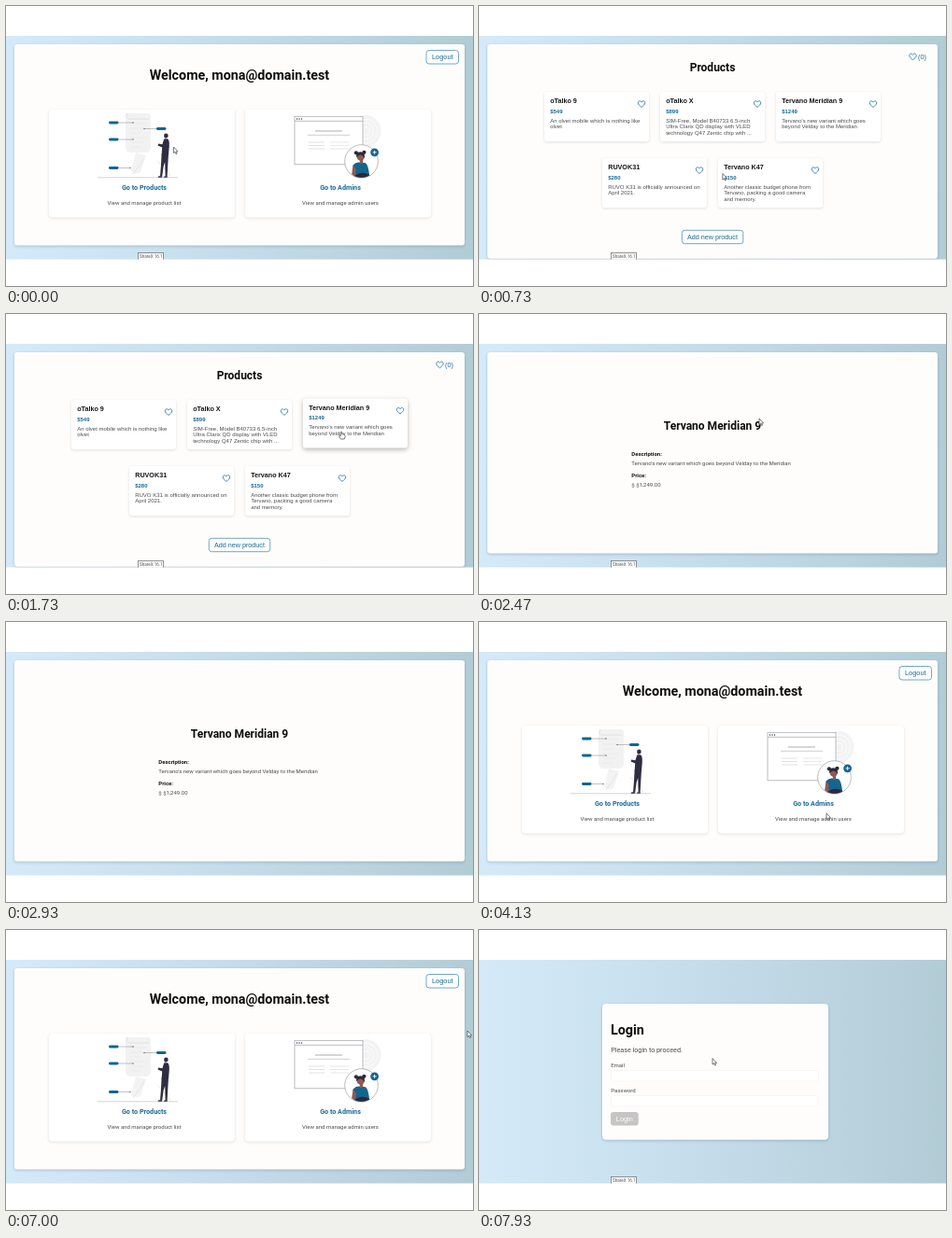
Write an HTML page that moves like this. It is 500x300 px and loops after 8 s.

```html
<!DOCTYPE html>
<html lang="en">
<head>
<meta charset="utf-8">
<title>Product admin demo</title>
<style>
html, body { margin: 0; width: 100%; height: 100%; overflow: hidden; background: #fff; }
svg { display: block; width: 500px; height: 300px; }
text { font-family: Roboto, sans-serif; font-size: 6px; fill: #4c4c4c; }
.ui { font-family: "Liberation Sans", Arial, sans-serif; }
.h { font-weight: 700; fill: #0c0c0c; }
.b { font-weight: 700; fill: #161616; }
.blue { fill: #1a6a96; }
.mid { text-anchor: middle; }
.panel { fill: #fefdfc; filter: drop-shadow(0 1px 1.5px rgba(40, 80, 110, .28)); }
.card { fill: #fff; filter: drop-shadow(0 1.4px 1.4px rgba(60, 60, 60, .15)); }
.lift .card { filter: drop-shadow(0 2px 2.5px rgba(50, 50, 50, .34)); }
.btn { fill: #fefefe; stroke: #6fa8c7; stroke-width: 1; }
.btn.over { fill: #e6f1f7; }
.heart { fill: none; stroke: #3985ab; stroke-width: .95; stroke-linejoin: round; }
</style>
</head>
<body>
<svg viewBox="0 0 500 300">
  <defs>
    <linearGradient id="sky">
      <stop offset="0" stop-color="#d5eaf9"/>
      <stop offset=".5" stop-color="#c4dce9"/>
      <stop offset="1" stop-color="#b2ccd6"/>
    </linearGradient>
    <clipPath id="view"><rect y="32" width="500" height="239.5"/></clipPath>
    <clipPath id="face"><circle cx="380.5" cy="166.5" r="17.3"/></clipPath>
  </defs>
  <g clip-path="url(#view)">
    <rect y="32" width="500" height="240" fill="url(#sky)"/>
    <g id="pages"></g>
    <g id="tip">
      <rect x="141.5" y="264.5" width="27" height="9" fill="#fff" stroke="#777" stroke-width=".8"/>
      <text x="143" y="270" style="font-size:4.6px;fill:#555">ShareX 16.1</text>
    </g>
    <g id="pointer" stroke="#4c4c4c" stroke-width=".75" stroke-linejoin="round" fill="#fff">
      <path id="arrow" d="M0 0V6.6L1.5 5.3L2.6 7.6L3.6 7.1L2.6 4.9H4.6Z"/>
      <path id="hand" d="M-.8 4V.5Q0-.5.8.5V2.8Q3.8 2.6 4 4.2V6L3.2 8H-.6L-2.6 5.2Q-2.4 4-.8 5Z"/>
    </g>
  </g>
</svg>
<script>
const LOOP = 8000, STEP = 1000 / 15;
const $ = id => document.getElementById(id);

const text = (x, y, s, cls = '', size = 6) =>
  `<text x="${x}" y="${y}" class="${cls}" style="font-size:${size}px">${s}</text>`;
const rect = (x, y, w, h, r, cls, more = '') =>
  `<rect x="${x}" y="${y}" width="${w}" height="${h}" rx="${r}" class="${cls}" ${more}/>`;
const panel = bottom => rect(9, 41, 482, bottom - 41, 3, 'panel');
const heart = (x, y) =>
  `<path class="heart" transform="translate(${x} ${y})" d="M0 3.4C-2.2 1.7-3.7.4-3.7-1.2C-3.7-3.6-.9-3.9 0-1.9C.9-3.9 3.7-3.6 3.7-1.2C3.7.4 2.2 1.7 0 3.4Z"/>`;
const line = (x1, x2, y, color, w = 1) =>
  `<path d="M${x1} ${y}H${x2}" stroke="${color}" stroke-width="${w}" fill="none"/>`;

// [pill x, line start, line end, y]
const labels = [[110, 120, 136, 125], [161, 148, 161, 131.5], [110, 120, 136, 143], [110, 120, 133, 173.5]];

function workerArt() {
  const rows = [0, 1, 2, 3, 4, 5].map(i => line(133, 150 - i % 3 * 3, 126 + i * 5, '#e6e6e6', .7)).join('');
  return `<path d="M130 115H151Q155 115 155 119V151Q155 157 149 157H134Q128 157 128 151V120Q128 115 130 115Z" fill="#f2f2f2"/>
    <path d="M130 115Q127 121 133 121H153" fill="none" stroke="#e0e0e0"/>${rows}
    <path d="M139 157L134 176Q137 182 144 178L150 160" fill="#f3f3f3"/>
    <path d="M136 180Q144 170 148 162M162 166L176 182" fill="none" stroke="#e4e4e4" stroke-width=".8"/>
    ${line(98, 184, 183.8, '#b4b4ba', .6)}` +
    labels.map(([x, a, b, y]) => line(a, b, y, '#999', .6) +
      `<circle cx="${x < a ? b : a}" cy="${y}" r=".8" fill="#777"/>` +
      rect(x, y - 1.4, 10.5, 2.8, 1.4, '', 'fill="#13658f"')).join('') +
    `<path d="M169.4 138.4Q169.4 141 170.4 142.6L172.2 142.2" fill="#a87070"/>
      <g fill="#2f2e41"><circle cx="171.4" cy="138.9" r="2.3"/>
      <path d="M169.2 142.6L173 142.3Q175.2 144 174.8 150L174 159.5H166.6L167.2 151.6L162.6 149.4L163 147.6L167.4 148.2Z"/>
      <path d="M166.6 158.5H174L173.4 168L172.6 182.5H170.6L170.2 167L168.6 172L167.2 182.5H165L166 170Z"/>
      <path d="M163.4 182.3H167.2V183.8H162.6ZM169.8 182.3H172.8V183.8H168.6Z"/></g>`;
}

function adminArt() {
  const arcs = [4, 8, 12].map(r =>
    `<ellipse cx="385.5" cy="134" rx="${r}" ry="${r * 1.08}"/>`).join('');
  const cols = [0, 1, 2].map(i => line(324, 341, 146 + i * 3.5, '#e2e2e2', 1.1) +
    line(347, 367, 146 + i * 3.5, '#e8e8e8', 1.1)).join('');
  return `<ellipse cx="385.5" cy="134" rx="16" ry="17" fill="#f3f3f3"/>
    <g fill="none" stroke="#fafafa" stroke-width="1.2">${arcs}</g>
    <rect x="309" y="118.3" width="73" height="51.5" fill="#fff" stroke="#a2a2a8" stroke-width=".7"/>
    ${line(309, 382, 123.3, '#a2a2a8', .7)}
    ${[311.5, 314, 316.5].map(x => `<circle cx="${x}" cy="120.9" r=".75" fill="#3f3d56"/>`).join('')}
    ${line(331, 360, 134, '#c8c8c8', 1.4)}${line(323, 368, 138.3, '#d8d8d8', 1.3)}${cols}
    <circle cx="380.5" cy="166.5" r="17.8" fill="#fff" stroke="#a0a0a6" stroke-width=".7"/>
    <g clip-path="url(#face)"><g transform="translate(57 25.5) scale(.85)">
      <path d="M371 188L370 171Q373 166.5 379 167L386 168Q390 171 391 188Z" fill="#14658e"/>
      <path d="M370 171L368 185H373L374 176ZM378 162H382.6V168L379 169Z" fill="#8e5a55"/>
      <circle cx="379.6" cy="160" r="4.7" fill="#8e5a55"/>
      <g fill="#2b2939"><circle cx="374" cy="155" r="2.5"/><circle cx="384" cy="154.5" r="2.5"/>
        <path d="M374.2 161Q373.5 154 379.3 153.8Q385.4 154 384.7 162Q382.6 157.8 379 157.5Q376 158 374.2 161Z"/>
        <path d="M372 184Q381 177 391 183V190H371Z"/></g>
    </g></g>
    <circle cx="394.6" cy="156.8" r="4.4" fill="#14658e"/>
    <path d="M392.6 156.8H396.6M394.6 154.8V158.8" stroke="#fff" stroke-width=".9"/>`;
}

const home = panel(256.5) +
  rect(450, 47.5, 34.5, 14.5, 3, 'btn', 'id="logout"') + text(467.3, 57.2, 'Logout', 'ui blue mid', 7.4) +
  text(250, 78.7, 'Welcome, mona@domain.test', 'h mid', 14.3) +
  rect(46, 111, 199, 115.6, 4, 'card') + rect(256, 111, 199, 115.6, 4, 'card') +
  workerArt() + adminArt() +
  text(148, 196.6, 'Go to Products', 'b blue mid', 7.2) +
  text(358, 196.6, 'Go to Admins', 'b blue mid', 7.2) +
  text(148, 213.2, 'View and manage product list', 'mid') +
  text(358, 213.2, 'View and manage admin users', 'mid');

const items = [
  [70, 92, 'oTalko 9', 549, 'An olvet mobile which is nothing like|olvet'],
  [194, 92, 'oTalko X', 899, 'SIM-Free, Model B40733 6.5-inch|Ultra Clarix QD display with VLED|technology Q47 Zentic chip with ...'],
  [318, 92, 'Tervano Meridian 9', 1249, "Tervano's new variant which goes|beyond Velday to the Meridian"],
  [132, 163, 'RUVOK31', 280, 'RUVO K31 is officially announced on|April 2021.'],
  [256, 163, 'Tervano K47', 150, 'Another classic budget phone from|Tervano, packing a good camera|and memory.']
];
const item = ([x, y, name, price, about], i) => `<g id="item${i}">` +
  rect(x, y, 112, 53, 3, 'card') +
  text(x + 6.2, y + 12.4, name, 'ui b', 7.2) +
  text(x + 6.2, y + 22.6, '$' + price, 'ui b blue', 6) +
  about.split('|').map((s, k) => text(x + 6.2, y + 32.6 + k * 6.6, s, 'ui')).join('') +
  heart(x + 104, y + 13) + '</g>';

const products = panel(270.7) + heart(464.5, 54.3) + text(470, 57, '(0)', 'ui blue', 7.3) +
  text(250, 69.5, 'Products', 'h mid', 12) + items.map(item).join('') +
  rect(217.3, 240.3, 65.5, 14.4, 3, 'btn') + text(250, 250, 'Add new product', 'ui blue mid', 7.2);

const detail = panel(256.5) + text(250, 124, 'Tervano Meridian 9', 'h mid', 12) +
  text(163.3, 152.3, 'Description:', 'b') +
  text(163.3, 162.3, "Tervano's new variant which goes beyond Velday to the Meridian") +
  text(163.3, 175.3, 'Price:', 'b') + text(163.3, 185.3, '$ $1,249.00');

const denied = panel(256.5) + text(250, 143.4, 'Access error', 'h mid', 12) +
  text(250, 165.6, 'You are not authorized to view this data. Please login as admin and try again.', 'mid');

const field = y => rect(141.5, y, 222, 11.5, 2, '', 'fill="#fff" stroke="#f6f4f3" stroke-width=".8"');
const login = rect(132, 79, 242, 145.7, 4, 'panel') +
  text(141, 111.8, 'Login', 'h', 14.3) +
  text(141.2, 130.8, 'Please login to proceed.', '', 7.2) +
  text(141.2, 147, 'Email') + field(150.5) + text(141.2, 174, 'Password') + field(177.5) +
  rect(141, 195, 29.7, 14.4, 3, '', 'fill="#c5c5c5"') + text(155.8, 204.8, 'Login', 'ui mid', 7.3).replace('px"', 'px;fill:#fff"');

const pages = { home, products, blank: panel(256.5), detail, denied, login };
$('pages').innerHTML = Object.entries(pages).map(([id, s]) => `<g id="${id}">${s}</g>`).join('');

// [time, value]
const shown = [[0, 'home'], [530, 'products'], [2000, 'blank'], [2130, 'detail'], [3470, 'products'],
  [3870, 'home'], [4600, 'blank'], [4730, 'denied'], [6070, 'home'], [7530, 'login']];
const scroll = [[930, 0], [1070, 8.8], [1270, 8.8], [1530, 0]];
const lift = [[1530, 0], [1720, -1.4]];
// [time, x, y]
const path = [[0, 179.5, 151], [330, 157, 193], [530, 157, 193], [870, 318, 172], [1190, 340, 152],
  [1330, 341, 151], [1720, 359, 126], [2000, 359, 126], [2330, 300, 112], [2470, 300, 112],
  [2860, 45, 20], [3860, 60, 20], [3930, 140, 85], [4130, 372, 205], [4400, 371, 194],
  [4730, 371, 194], [4930, 182, 184], [5060, 182, 184], [5200, 161.5, 168.5], [5330, 52, 40],
  [5460, 52, 40], [5660, 22, 20], [6100, 510, 120], [6930, 510, 120], [7000, 494, 108],
  [7330, 467, 53], [7530, 467, 53], [7920, 250, 137.5]];

const last = (keys, t) => keys.filter(k => k[0] <= t + 5).pop()[1];

function at(keys, t, col = 1) {
  const n = keys.findIndex(k => k[0] > t);
  if (n < 0) return keys[keys.length - 1][col];
  if (!n) return keys[0][col];
  const a = keys[n - 1], b = keys[n], p = (t - a[0]) / (b[0] - a[0]);
  return a[col] + (b[col] - a[col]) * p * p * (3 - 2 * p);
}

const show = (id, on) => { $(id).style.display = on ? '' : 'none'; };
const move = (id, x, y) => $(id).setAttribute('transform', `translate(${x} ${y})`);

function draw(now) {
  const t = Math.floor((now % LOOP + 4) / STEP) * STEP % LOOP;
  const page = last(shown, t), x = at(path, t, 1), y = at(path, t, 2);
  for (const id in pages) show(id, id === page);
  move('products', 0, -at(scroll, t));
  const up = t < 3000 ? at(lift, t) : 0;
  move('item2', 0, up);
  $('item2').classList.toggle('lift', up < -.5);
  const overLogout = t > 7250 && t < 7530;
  $('logout').classList.toggle('over', overLogout);
  show('tip', t < 2470 || t > 7525);
  const onLink = overLogout || up < -.5 && t < 2000 || t > 260 && t < 530 || t > 4330 && t < 4600;
  show('arrow', !onLink);
  show('hand', onLink);
  move('pointer', x, y);
}

const start = performance.now();
function tick() {
  draw(performance.now() - start);
  requestAnimationFrame(tick);
}
draw(0);
requestAnimationFrame(tick);
</script>
</body>
</html>
```
